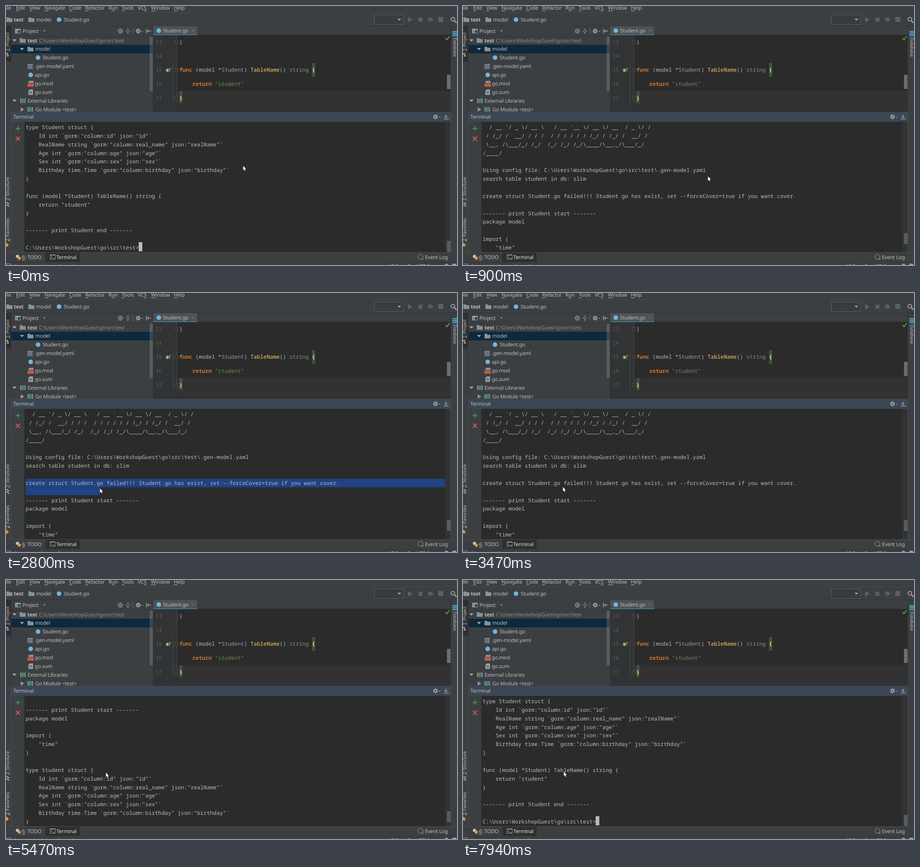
An HTML page with a canvas that plays this animation: 986x568 px, repeating every 8000 ms.

```html
<!DOCTYPE html>
<html lang="en">
<head>
<meta charset="utf-8">
<title>Terminal scrolling</title>
<style>
html, body { margin: 0; width: 100%; height: 100%; overflow: hidden; background: #3c3f41; }
canvas { display: block; }
</style>
</head>
<body>
<canvas id="stage" width="986" height="568"></canvas>
<script>
const ctx = document.getElementById('stage').getContext('2d');
const LOOP = 8000, CELL = 7.07, ROW = 18.86, ROWS = 15, LEFT = 43;
const UI = '"Noto Sans", "Open Sans", sans-serif';
const MONO = '"Noto Sans Mono", "DejaVu Sans Mono", monospace';
const PANEL = '#3c3f41', DARK = '#2b2b2b', TEXT = '#bbbbbb', ICON = '#9a9da0', LINE = '#323537', FRAME = '#4a4c4e';

const HOME = 'C:\\Users\\WorkshopGuest\\go\\src\\test';
const LOG = [
  '  / __ `/ _ \\/ __ \\   / __ `__ \\/ __ \\/ __  / _ \\/ /',
  ' / /_/ /  __/ / / /  / / / / / / /_/ / /_/ /  __/ /',
  ' \\__, /\\___/_/ /_/  /_/ /_/ /_/\\____/\\__,_/\\___/_/',
  '/____/',
  '',
  `Using config file: ${HOME}\\.gen-model.yaml`,
  'search table student in db: slim',
  '',
  'create struct Student.go failed!!! Student.go has exist, set --forceCover=true if you want cover.',
  '',
  '------- print Student start -------',
  'package model',
  '',
  'import (',
  '    "time"',
  ')',
  '',
  'type Student struct {',
  '    Id int `gorm:"column:id" json:"id"`',
  '    RealName string `gorm:"column:real_name" json:"realName"`',
  '    Age int `gorm:"column:age" json:"age"`',
  '    Sex int `gorm:"column:sex" json:"sex"`',
  '    Birthday time.Time `gorm:"column:birthday" json:"birthday"`',
  '}',
  '',
  'func (model *Student) TableName() string {',
  '    return "student"',
  '}',
  '',
  '------- print Student end -------',
  '',
  `${HOME}>`
];

// [time, value...] lists; each value holds until the next time
const SCROLL = [[0, 17], [120, 16], [270, 14], [420, 11], [540, 8], [660, 5], [780, 2], [900, 0],
  [3780, 4], [4060, 11], [4360, 17], [4920, 15], [5040, 12], [5470, 9], [5620, 8], [6180, 13], [6460, 17]];
const POINTER = [[0, 518, 350], [420, 522, 356], [660, 531, 368], [900, 535, 373], [1170, 503, 384],
  [1320, 459, 403], [1570, 284, 429], [1720, 106, 435], [1870, 62, 424], [1990, 38, 412], [2110, 26, 405],
  [2260, 36, 405], [2380, 44, 409], [2530, 84, 416], [2650, 175, 422], [2800, 205, 428], [2920, 217, 431],
  [3350, 218, 428], [3470, 218, 425], [4360, 218, 422], [6180, 220, 420]];
const CARET = [[0, 1], [120, 0], [6890, 1], [7350, 0], [7940, 1]];
const SELECT = [[0, 0], [2530, 1], [2800, 2], [3470, 0]];

const at = (track, t) => track.findLast(k => k[0] <= t).slice(1);

function rect(x, y, w, h, color) {
  ctx.fillStyle = color;
  ctx.fillRect(x, y, w, h);
}

function path(points, color, width = 0) {
  ctx.beginPath();
  points.forEach(([x, y]) => ctx.lineTo(x, y));
  if (width) {
    ctx.strokeStyle = color;
    ctx.lineWidth = width;
    ctx.stroke();
  } else {
    ctx.closePath();
    ctx.fillStyle = color;
    ctx.fill();
  }
}

function disc(x, y, r, color, width = 0) {
  ctx.beginPath();
  ctx.arc(x, y, r, 0, 7);
  ctx.fillStyle = ctx.strokeStyle = color;
  ctx.lineWidth = width;
  width ? ctx.stroke() : ctx.fill();
}

// y is the middle of the line of text
function label(text, x, y, color = TEXT, weight = 400) {
  ctx.font = `${weight} 11.3px ${UI}`;
  ctx.letterSpacing = '-0.25px';
  ctx.fillStyle = color;
  ctx.fillText(text, x, y + 4);
}

function mono(text, x, y, color = TEXT, weight = 400) {
  ctx.font = `${weight} 11.75px ${MONO}`;
  ctx.letterSpacing = '0px';
  ctx.fillStyle = color;
  [...text].forEach((c, i) => c !== ' ' && ctx.fillText(c, x + i * CELL, y + 4));
}

function sideLabel(text, x, y, turn) {
  ctx.save();
  ctx.translate(x, y);
  ctx.rotate(turn * Math.PI / 2);
  ctx.scale(0.88, 0.88);
  label(text, 0, 0);
  ctx.restore();
}

function folder(x, y) {
  path([[x, y - 5], [x + 5, y - 5], [x + 7, y - 3], [x + 13, y - 3], [x + 13, y + 5], [x, y + 5]], '#87939a');
}

const goFile = (x, y) => disc(x, y, 5, '#6fb8d8');
const down = (x, y, color = ICON, r = 4) => path([[x - r, y - r / 2], [x + r, y - r / 2], [x, y + r / 2]], color);

function gear(x, y) {
  for (let i = 0; i < 4; i++) {
    const a = i * Math.PI / 4, dx = 5.5 * Math.cos(a), dy = 5.5 * Math.sin(a);
    path([[x - dx, y - dy], [x + dx, y + dy]], ICON, 2);
  }
  disc(x, y, 3.8, ICON);
  disc(x, y, 1.6, PANEL);
  down(x + 9, y + 1, ICON, 2);
}

function bars(x, y) {
  ['#8a9aa5', '#62b543', '#40a0c8', '#8a9aa5'].forEach((c, i) => rect(x + i * 3.3, y - 5, 2, 10, c));
}

function menuAndToolbar() {
  const items = [['File', -6, 0], ['Edit', 22, 0], ['View', 51, 0], ['Navigate', 84, 0], ['Code', 138, 0],
    ['Refactor', 173, 0], ['Run', 224, 1], ['Tools', 253, 0], ['VCS', 288, 2], ['Window', 317, 0], ['Help', 367, 0]];
  items.forEach(([text, x, key]) => {
    label(text, x, 4);
    const start = x + ctx.measureText(text.slice(0, key)).width;
    rect(start, 10, ctx.measureText(text[key]).width, 1, TEXT);
  });
  rect(0, 14, 986, 1, '#45484a');
  folder(1, 30);
  label('test', 17, 30, TEXT, 700);
  folder(49, 30);
  label('model', 66, 30);
  goFile(116, 30);
  label('Student.go', 126, 30);
  [41, 103, 188].forEach(x => path([[x, 21], [x + 4, 30], [x, 39]], '#333638', 1));

  rect(805, 19, 65, 22, '#5a5d5f');
  rect(806, 20, 63, 20, '#393c3e');
  down(860, 30, '#a8abad');
  const off = '#5d6062';
  path([[879, 24], [889, 30], [879, 36]], off);
  disc(906, 30, 4.5, off);
  path([[901, 25], [911, 35]], off, 1.5);
  path([[911, 25], [901, 35]], off, 1.5);
  path([[923, 24], [928, 28], [923, 36]], off);
  path([[927, 24], [935, 30], [927, 36]], off);
  rect(945, 24, 11, 11, off);
  disc(977, 29, 4, ICON, 2);
  path([[980, 32], [985, 37]], ICON, 2.5);
  rect(0, 43, 986, 1, LINE);
}

function sideStrips() {
  rect(0, 44, 11, 78, '#2d2f30');
  rect(11, 44, 1, 188, LINE);
  sideLabel('1: Project', 3, 99, -1);
  rect(0, 103, 5, 3, ICON);
  rect(2, 107, 4, 4, ICON);
  sideLabel('7: Structure', 3, 427, -1);
  [[1, 430], [1, 435], [4, 432], [4, 437]].forEach(([x, y]) => rect(x, y, 3, 3, ICON));
  sideLabel('2: Favorites', 3, 516, -1);
  [94, 422, 511].forEach(y => rect(7, y, 1, 5, TEXT));
  const star = Array.from({ length: 10 }, (_, i) => {
    const r = i % 2 ? 2.5 : 6, a = i * Math.PI / 5;
    return [1.5 + r * Math.sin(a), 524 - r * Math.cos(a)];
  });
  path(star, '#e5a03c');
  rect(972, 44, 1, 188, LINE);
  [55, 59, 63].forEach(y => rect(976, y, 10, 3, '#3e9cc0'));
  sideLabel('Database', 982, 69, 1);
}

function projectTree() {
  rect(20, 50, 12, 10, ICON);
  rect(22, 53, 3, 6, '#4a8fb5');
  rect(26, 53, 5, 6, PANEL);
  label('Project', 36, 55);
  down(84, 55, ICON, 3);
  disc(250, 55, 4.5, ICON, 1.5);
  path([[245, 55], [255, 55]], ICON, 1);
  path([[250, 50], [250, 60]], ICON, 1);
  path([[261, 55], [272, 55]], ICON, 1);
  down(266.5, 51.5, ICON, 2.5);
  path([[264, 60], [269, 60], [266.5, 57]], ICON);
  rect(277, 48, 1, 14, '#6b6e70');
  gear(289, 55);
  rect(306, 50, 1.5, 10, ICON);
  path([[317, 55], [309, 55]], ICON, 1.5);
  path([[312, 52], [309, 55], [312, 58]], ICON, 1.5);
  rect(12, 66, 309, 1, LINE);

  const y = i => 75.5 + i * 18.9;
  rect(12, 85, 309, 19, '#0d293e');
  down(18.5, y(0), '#b0b3b5', 4.5);
  folder(30, y(0));
  label('test', 47, y(0), TEXT, 700);
  label(HOME, 72, y(0), '#8c8c8c');
  down(35, y(1), '#b0b3b5', 4.5);
  folder(47, y(1));
  label('model', 64, y(1));
  goFile(70, y(2));
  label('Student.go', 80, y(2));
  rect(47, y(3) - 5, 12, 11, '#87939a');
  for (let i = 0; i < 9; i++) rect(48 + i % 3 * 4, y(3) - 3 + (i / 3 | 0) * 3, 3, 2, '#4d5357');
  label('.gen-model.yaml', 63, y(3));
  goFile(54, y(4));
  label('api.go', 63, y(4));
  path([[51, 164], [60, 164], [60, 169], [49, 169], [49, 166]], '#87939a');
  rect(47, 170, 14, 7, '#c75a35');
  label('go.mod', 63, y(5));
  path([[52, 183], [59, 183], [59, 195], [49, 195], [49, 186]], '#9aa5ab');
  [187, 189, 191].forEach(v => rect(51, v, 6, 1, '#4d5357'));
  label('go.sum', 63, y(6));
  down(18.5, y(7), '#b0b3b5', 4.5);
  bars(31, y(7));
  label('External Libraries', 47, y(7));
  path([[32, 222], [40, 227], [32, 232]], '#8f9294');
  bars(47, y(8));
  label('Go Module <test>', 64, y(8));
  rect(314, 67, 7, 120, 'rgba(255, 255, 255, 0.15)');
  rect(321, 44, 1, 188, LINE);
}

function editor() {
  rect(322, 44, 96, 18, '#4e5254');
  goFile(334, 54);
  label('Student.go', 343, 54);
  path([[406, 51], [412, 57]], '#74777a', 1);
  path([[412, 51], [406, 57]], '#74777a', 1);
  rect(322, 63, 650, 169, DARK);
  rect(322, 62, 96, 2, '#467487');
  rect(322, 64, 51, 168, '#313335');
  rect(374, 186, 598, 46, '#323232');
  rect(373, 64, 1, 149, '#484b4d');
  rect(365, 125, 1, 88, '#4c5052');
  rect(669, 125, 7, 30, '#3b514d');
  rect(379, 187, 7, 26, '#3b514d');
  const y = i => 79 + i * 30.65;
  for (let i = 0; i < 5; i++) mono(String(13 + i), 327, y(i), '#5b5f61');
  [0, 2, 4].forEach(i => {
    rect(370, y(i) - 4, 7, 8, '#4c4f51');
    rect(371, y(i) - 3, 5, 6, DARK);
    rect(372, y(i) - 0.5, 3, 1, '#5a5d5f');
  });
  disc(353, 141, 4, '#4f9e58');
  rect(352, 139, 2, 4, '#c5d8c5');
  path([[358.5, 145], [358.5, 136]], '#d05a50', 1.2);
  path([[356, 139], [358.5, 136], [361, 139]], '#d05a50', 1.2);

  const code = (col, row, text, color, weight) => mono(text, 379 + col * CELL, y(row), color, weight);
  code(0, 0, '}', '#a9b7c6');
  code(0, 2, 'func', '#cc7832', 700);
  code(5, 2, '(model *', '#a9b7c6');
  code(13, 2, 'Student', '#8f9da3');
  code(20, 2, ')', '#a9b7c6');
  code(22, 2, 'TableName', '#ffc66d');
  code(31, 2, '()', '#a9b7c6');
  code(34, 2, 'string', '#858b88');
  code(41, 2, '{', '#ffef28', 700);
  code(4, 3, 'return', '#cc7832', 700);
  code(11, 3, '"student"', '#6a8759');
  code(0, 4, '}', '#ffef28', 700);
  path([[961, 70], [964, 74], [970, 66]], '#4faa4f', 2);
  rect(964, 151, 8, 31, '#6a6c6d');
}

function terminalFrame() {
  rect(12, 232, 960, 22, '#3b4754');
  label('Terminal', 16, 243);
  gear(939, 243);
  path([[962, 238], [962, 245]], ICON, 1.5);
  path([[959, 242], [962, 245], [965, 242]], ICON, 1.5);
  rect(957, 247, 11, 1.5, ICON);
  rect(40, 254, 932, 286, DARK);
  rect(960, 254, 12, 286, '#313335');
  rect(11, 232, 1, 308, FRAME);
  rect(972, 232, 1, 308, FRAME);
  rect(21, 268, 10, 1.6, '#49a658');
  rect(25.2, 263.5, 1.6, 10, '#49a658');
  path([[21.5, 286.5], [30.5, 295.5]], '#d75a4a', 2);
  path([[30.5, 286.5], [21.5, 295.5]], '#d75a4a', 2);
}

function bottomBar() {
  rect(0, 540, 986, 28, PANEL);
  rect(0, 540, 986, 1, FRAME);
  disc(25, 549, 3.5, '#c9c3b5');
  disc(29, 553, 3.5, '#d39a4a');
  label('6: TODO', 35, 551);
  rect(35, 557, 6, 1, TEXT);
  rect(86, 541, 75, 20, '#2d2f30');
  rect(96, 545, 12, 11, ICON);
  rect(97, 547, 10, 8, '#26282a');
  path([[98, 548.5], [101, 551], [98, 553.5]], TEXT, 1);
  rect(102, 553, 4, 1, TEXT);
  label('Terminal', 110, 551, '#dddddd');
  disc(906, 550, 5.5, ICON, 1);
  path([[909, 555], [913, 557], [911, 553]], ICON);
  label('Event Log', 916, 551);
  rect(0, 562, 986, 1, LINE);
  rect(0, 565, 10, 1, ICON);
  rect(10, 565, 1, 3, ICON);
  label('Now up to date on branch', 18, 571);
  label('17:2', 837, 571);
  label('LF:', 872, 571);
  label('UTF-8:', 897, 571);
  disc(963, 569, 4, '#5fa8c8');
  rect(976, 565, 8, 3, ICON);
}

function terminalLog(t) {
  const [top] = at(SCROLL, t), [tipX, tipY] = at(POINTER, t), [selected] = at(SELECT, t);
  if (selected) {
    const edge = Math.round((tipX - LEFT) / CELL) * CELL;
    const rowTop = 256.5 + (8 - top) * ROW;
    rect(LEFT, rowTop, selected > 1 ? 960 - LEFT : edge, ROW, '#214283');
    if (selected > 1) rect(LEFT, rowTop + ROW, edge, 17, '#214283');
  }
  LOG.slice(top, top + ROWS).forEach((line, i) => mono(line, LEFT, 266 + i * ROW));
  if (top === 17 && at(CARET, t)[0]) rect(290, 518, 8, 20, TEXT);
  rect(964, Math.round(498 + top), 8, 24, '#595b5d');
  pointer(tipX + 0.5, tipY + 0.5);
}

function pointer(x, y) {
  const shape = [[0, 0], [0, 9.5], [2, 7.6], [3.6, 11], [5, 10.3], [3.7, 7], [6.4, 6.8]]
    .map(([dx, dy]) => [x + dx, y + dy]);
  path([...shape, shape[0]], '#111111', 0.8);
  path(shape, '#ffffff');
}

function draw(now) {
  ctx.textRendering = 'geometricPrecision';
  rect(0, 0, 986, 568, PANEL);
  menuAndToolbar();
  projectTree();
  editor();
  sideStrips();
  terminalFrame();
  terminalLog(now % LOOP);
  bottomBar();
}

const start = performance.now();
function tick() {
  draw(performance.now() - start);
  requestAnimationFrame(tick);
}
tick();
</script>
</body>
</html>
```
